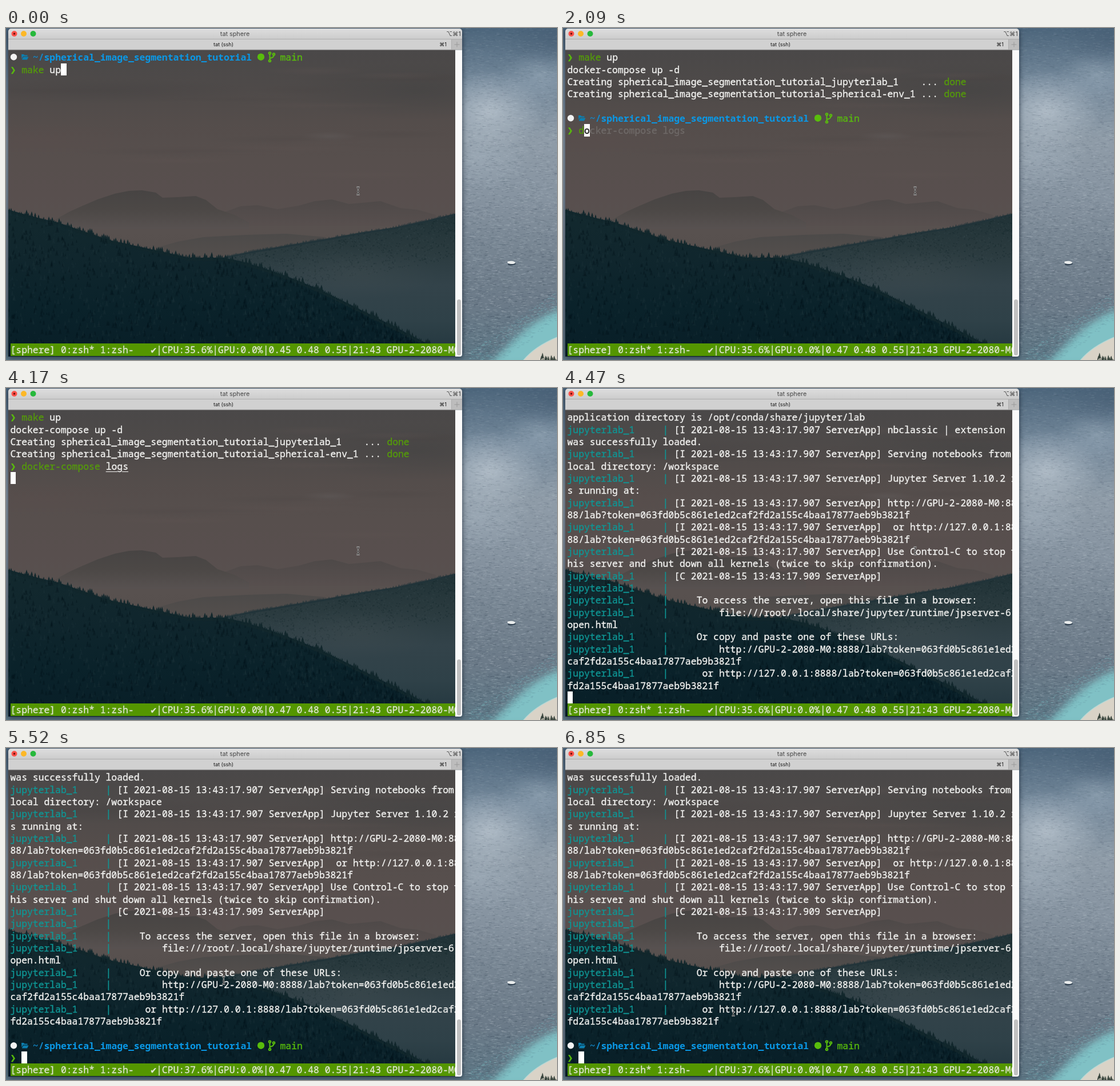
These frames come from a looping animation (964x581 px, 8 s). An HTML page with a canvas:

```html
<!DOCTYPE html>
<html lang="en">
<head>
<meta charset="utf-8">
<title>Terminal session</title>
<style>
  html, body { margin: 0; width: 100%; height: 100%; overflow: hidden; background: #76879a; }
  #stage { position: relative; width: 964px; height: 581px; overflow: hidden; }
  canvas, svg { position: absolute; left: 0; top: 0; }
  #win { position: absolute; left: 4px; top: 1px; width: 794px; height: 574px;
    border-radius: 5px 5px 4px 4px; box-shadow: 0 2px 9px 1px rgba(15, 25, 40, .6); }
  #screen { position: absolute; left: 0; top: 38px; width: 786px; height: 537px; overflow: hidden; }
  #screen span { position: absolute; white-space: pre; color: #f2f2f0; height: 21.33px;
    font: 500 16.39px/21.33px "Noto Sans Mono", "DejaVu Sans Mono", monospace;
    font-variant-ligatures: none; -webkit-text-stroke: .35px currentColor; }
  #screen .cmd { color: #559b0a; }
  #screen .main { color: #59bd0c; }
  #screen .path { color: #0a98e6; font-weight: 700; -webkit-text-stroke: 0; }
  #screen .home { color: #1289cb; font-weight: 700; -webkit-text-stroke: 0; }
  #screen .teal { color: #0f9695; }
  #screen .ghost { color: #6f6a68; }
  #screen .under { text-decoration: underline; text-decoration-thickness: 1px; text-underline-offset: 3px; }
  #screen .cursor { background: #fff; color: #111; min-width: 9.83px; }
  #screen .sel { background: #bb9a00; color: #16140a; }
  #screen .bar { background: #549600; color: #dfe5d3; width: 779px; }
  #screen .check { color: #dfe5d3; }
  #screen svg { overflow: visible; }
  #chrome text { font-family: Inter, "DejaVu Sans", sans-serif; text-anchor: middle; }
</style>
</head>
<body>
<div id="stage">
  <canvas id="sea" width="964" height="581"></canvas>
  <div id="win"></div>
  <canvas id="hills" width="964" height="581"></canvas>
  <div id="screen"></div>
  <svg id="chrome" width="964" height="581">
    <defs>
      <linearGradient id="title" x2="0" y2="1">
        <stop stop-color="#dedede"/><stop offset="1" stop-color="#cbcbcb"/>
      </linearGradient>
    </defs>
    <path d="M4 20V6a5 5 0 0 1 5-5H793a5 5 0 0 1 5 5V20Z" fill="url(#title)"/>
    <path d="M4 20H798V38H4Z" fill="#d1d1d1"/>
    <path d="M780 20H798V38H780Z" fill="#bdbdbd"/>
    <path d="M4 19.5H798M4 38H798M779.5 20V38" stroke="#adadad" fill="none"/>
    <path d="M784.5 29H793.5M789 24.5V33.5" stroke="#999"/>
    <circle cx="14.5" cy="10" r="5" fill="#fb5149"/><circle cx="14.5" cy="10" r="1.7" fill="#6d0b08"/>
    <circle cx="31" cy="10" r="5" fill="#fdb827"/>
    <circle cx="47.5" cy="10" r="5" fill="#27b93c"/>
    <text x="400.5" y="14" font-size="10.8" fill="#454545">tat sphere</text>
    <text x="783" y="14" font-size="10.5" fill="#444">⌥⌘1</text>
    <text x="380.5" y="32.3" font-size="9" fill="#151515">tat (ssh)</text>
    <text x="764.5" y="32.3" font-size="9" fill="#151515">⌘1</text>
    <path d="M786 38.5H798V571a4 4 0 0 1-4 4H786Z" fill="#fafafa"/>
    <rect x="789" y="475" width="7" height="98" rx="3.5" fill="#c1c1c1"/>
    <g id="mouse" fill="none">
      <path id="beam" d="M-2.500-7Q0-6.500 0-4V4Q0 6.500-2.500 7M2.500-7Q0-6.500 0-4M0 4Q0 6.500 2.500 7M-1.500 1H1.500"/>
      <use href="#beam" stroke="#d8d8d8" stroke-width="2.2"/>
      <use href="#beam" stroke="#222"/>
    </g>
  </svg>
</div>
<script>
const $ = id => document.getElementById(id);
let seed = 7;
const rnd = (a = 0, b = 1) => {
  seed = (seed * 16807) % 2147483647;
  return a + (b - a) * seed / 2147483647;
};

// ---------- scenery ----------
const shade = (g, y0, y1, ...colors) => {
  const grad = g.createLinearGradient(0, y0, 0, y1);
  colors.forEach((c, i) => grad.addColorStop(i / (colors.length - 1), c));
  return grad;
};
const land = (g, points, base, fill) => {
  g.beginPath();
  g.moveTo(points[0][0], base);
  points.forEach(p => g.lineTo(...p));
  g.lineTo(points.at(-1)[0], base);
  g.fillStyle = fill;
  g.fill();
};
const heightAt = (points, x) => {
  const i = Math.max(1, points.findIndex(p => p[0] >= x));
  const [[x0, y0], [x1, y1]] = [points[i - 1], points[i]];
  return y0 + (y1 - y0) * (x - x0) / (x1 - x0);
};
const blob = (g, x, y, rx, ry, rgb, alpha) => {
  g.save();
  g.translate(x, y);
  g.scale(rx, ry);
  const grad = g.createRadialGradient(0, 0, 0, 0, 0, 1);
  grad.addColorStop(0, `rgba(${rgb},${alpha})`);
  grad.addColorStop(1, `rgba(${rgb},0)`);
  g.fillStyle = grad;
  g.fillRect(-1, -1, 2, 2);
  g.restore();
};
const tree = (g, x, y, h, fill) => {
  g.fillStyle = fill;
  for (let k = 0; k < 3; k++) {
    const top = y - h + k * h * .28, w = h * (.14 + .1 * k);
    g.beginPath();
    g.moveTo(x, top);
    g.lineTo(x + w, top + h * .45);
    g.lineTo(x - w, top + h * .45);
    g.fill();
  }
};

function drawSea() {
  const g = $('sea').getContext('2d');
  g.fillStyle = shade(g, 0, 581, '#4c657b', '#75899b', '#8f9ca8', '#8794a1', '#778592', '#6b7a88', '#5d7684');
  g.fillRect(0, 0, 964, 581);
  blob(g, 845, 145, 95, 70, '196,206,215', .65);
  blob(g, 830, 225, 90, 60, '172,186,198', .4);
  blob(g, 935, 85, 70, 45, '168,184,198', .4);
  blob(g, 960, 20, 90, 50, '60,82,105', .35);
  // ripples get stronger towards the shore
  for (let i = 0; i < 5000; i++) {
    const y = rnd(0, 575), a = .07 + y / 3600;
    g.fillStyle = rnd() < .5 ? `rgba(38,54,70,${a})` : `rgba(214,224,230,${a})`;
    g.fillRect(rnd(796, 964), y, rnd(2, 7), 1);
  }
  g.save();
  g.filter = 'blur(7px)';
  g.fillStyle = '#80c1c5';
  g.beginPath();
  g.moveTo(838, 592);
  g.bezierCurveTo(880, 566, 900, 512, 985, 488);
  g.lineTo(985, 592);
  g.fill();
  g.restore();
  for (let i = 0; i < 800; i++) {
    const x = rnd(810, 964), y = 596 - (x - 810) * .7 + rnd(-30, 24);
    g.fillStyle = rnd() < .5 ? 'rgba(128,196,200,.4)' : 'rgba(86,128,145,.3)';
    g.fillRect(x, y, rnd(1, 5), 1);
  }
  g.strokeStyle = '#b9d8d5';
  g.lineWidth = 3;
  g.fillStyle = '#d9d3c7';
  g.beginPath();
  g.moveTo(900, 590);
  g.quadraticCurveTo(922, 556, 980, 536);
  g.lineTo(980, 590);
  g.stroke();
  g.fill();
  for (let i = 0; i < 18; i++) tree(g, rnd(935, 964), rnd(577, 586), rnd(4, 10), '#38443c');
  g.fillStyle = '#334353';
  g.beginPath(); g.ellipse(885, 413, 7, 2.5, -.1, 0, 7); g.fill();
  g.fillStyle = '#e9ecec';
  g.beginPath(); g.ellipse(884, 410.3, 7, 2.6, .05, 0, 7); g.fill();
}

function drawHills() {
  const g = $('hills').getContext('2d');
  g.beginPath();
  g.rect(4, 38, 782, 537);
  g.clip();
  g.fillStyle = shade(g, 38, 420, '#4a4848', '#4e4a49', '#544d4b', '#574f4d', '#584f4e', '#58514f', '#554e4c');
  g.fillRect(4, 38, 782, 537);
  blob(g, 720, 110, 240, 50, '66,66,66', .55);
  blob(g, 180, 110, 260, 22, '70,67,67', .5);
  blob(g, 60, 195, 190, 30, '90,77,76', .4);
  blob(g, 565, 190, 48, 9, '96,91,90', .5);
  for (let i = 0; i < 16; i++)
    blob(g, rnd(0, 780), rnd(60, 260), rnd(70, 200), rnd(3, 9), i % 2 ? '72,67,66' : '95,84,82', .24);

  land(g, [[340, 335], [380, 323], [410, 312], [440, 310], [475, 317], [512, 311], [540, 303], [570, 300],
    [600, 308], [655, 303], [690, 315], [720, 318], [752, 327]], 346, shade(g, 300, 344, '#4e4948', '#574f4e'));
  land(g, [[85, 336], [110, 322], [132, 312], [160, 300], [190, 290], [215, 285], [238, 284], [262, 288],
    [274, 297], [300, 296], [332, 294], [350, 301], [370, 317], [400, 327], [425, 340]], 352,
    shade(g, 285, 350, '#474443', '#4c4846', '#575150'));
  land(g, [[265, 384], [300, 374], [345, 366], [420, 362], [490, 360], [560, 366]], 400,
    shade(g, 360, 396, '#4c4a49', '#534e4c'));

  const right = [[380, 401], [430, 391], [500, 379], [560, 369], [620, 358], [680, 349], [740, 336], [790, 324]];
  land(g, right, 576, shade(g, 325, 575, '#203236', '#2a3a3e', '#33434a', '#2f4148', '#22363e'));
  for (let x = 385; x < 788; x += 2.5) tree(g, x, heightAt(right, x) + 3, rnd(4, 7), '#22343a');
  for (let i = 0; i < 1300; i++) {
    const x = rnd(390, 786), y = heightAt(right, x) + rnd(2, 75);
    g.fillStyle = rnd() < .5 ? 'rgba(14,32,38,.25)' : 'rgba(70,86,88,.18)';
    g.fillRect(x, y, 2, 2);
  }
  blob(g, 610, 430, 150, 45, '66,77,80', .4);

  const left = [[0, 317], [50, 331], [90, 340], [130, 354], [180, 371], [230, 382], [280, 393], [320, 402],
    [380, 402], [410, 408], [450, 420], [500, 438], [545, 456], [590, 478], [630, 498], [680, 523],
    [720, 544], [760, 564]];
  land(g, left, 576, shade(g, 315, 575, '#13292e', '#10262d', '#0a222a', '#081e27'));
  for (let x = 3; x < 755; x += 3) tree(g, x, heightAt(left, x) + 5, 6 + 10 * rnd() ** 2, '#12272c');
  for (let i = 0; i < 2000; i++) {
    const x = rnd(4, 750), top = heightAt(left, x) + 8;
    const y = rnd(top, 582);
    if (y > top) tree(g, x, y, rnd(4, 11), rnd() < .55 ? 'rgba(4,18,24,.28)' : 'rgba(39,62,66,.18)');
  }
}

// ---------- terminal ----------
const X = 7.5, Y = 2.3, CW = 9.834, CH = 21.33;
const at = (col, row) => `left:${X + col * CW}px;top:${Y + row * CH}px`;
const put = (col, row, text, cls = '') => `<span class="${cls}" style="${at(col, row)}">${text}</span>`;
const cursor = (col, row, ch = ' ') => put(col, row, ch, 'cursor');
const arrow = row => put(0, row, '❯', 'main');

const icons = row => `<svg width="1" height="1" style="${at(0, row)}">
  <circle cx="5.5" cy="10.7" r="5.7" fill="#f3f3f3"/>
  <path d="M19 6h4l1.5 1.5h5V9.5H22L19.5 14ZM22.5 10.5H31.5L29 15.5H19.7Z" fill="#0c7fb0"/>
  <circle cx="438" cy="10.7" r="6.2" fill="#59bd0c"/>
  <g fill="none" stroke="#59bd0c" stroke-width="2">
    <path d="M453.5 6V16M460.5 8Q460.5 11.5 454 13"/>
    <circle cx="453.5" cy="4" r="1.8"/><circle cx="460.5" cy="6" r="1.8"/><circle cx="453.5" cy="17.5" r="1.8"/>
  </g></svg>`;
const prompt = row => icons(row) + put(4, row, '~/', 'home') +
  put(6, row, 'spherical_image_segmentation_tutorial', 'path') + put(48, row, 'main', 'main') + arrow(row + 1);

const status = (load = '0.47', cpu = '35.6', windows = '0:zsh* 1:zsh-   ') =>
  put(0, 24, `[sphere] ${windows} |CPU:${cpu}%|GPU:0.0%|${load} 0.48 0.55|21:43 GPU-2-2080-M0`, 'bar') +
  put(25, 24, '✔', 'check');

const make = row => put(2, row, 'make', 'cmd') + put(7, row, 'up');
const started = arrow(0) + make(0) + put(0, 1, 'docker-compose up -d');
const project = 'Creating spherical_image_segmentation_tutorial_';
const creating = started + put(0, 2, project + 'jupyterlab_1 ...') + put(0, 3, project + 'spherical-env_1 ...');
const done = started + ['jupyterlab_1   ', 'spherical-env_1'].map((name, i) =>
  put(0, i + 2, `${project}${name} ...`) + put(67, i + 2, 'done', 'cmd')).join('');

const command = 'docker-compose logs';
const typed = n => done + prompt(5) + put(2, 6, command.slice(0, n), 'cmd') +
  put(3 + n, 6, command.slice(n + 1), 'ghost') + cursor(2 + n, 6, command[n]);
const logs = row => put(2, row, 'docker-compose', 'cmd') + put(17, row, 'logs', 'under');

const info = '| [I 2021-08-15 13:43:17.907 ServerApp] ';
const token = '063fd0b5c861e1ed2caf2fd2a155c4baa17877aeb9b3821f';
const url = '88/lab?token=' + token;
const service = 'jupyterlab_1     ';
const log = [
  'application directory is /opt/conda/share/jupyter/lab',
  info + 'nbclassic | extension ',
  'was successfully loaded.',
  info + 'Serving notebooks from ',
  'local directory: /workspace',
  info + 'Jupyter Server 1.10.2 i',
  's running at:',
  info + 'http://GPU-2-2080-M0:88',
  url,
  info + ' or http://127.0.0.1:88',
  url,
  info + 'Use Control-C to stop t',
  'his server and shut down all kernels (twice to skip confirmation).',
  '| [C 2021-08-15 13:43:17.909 ServerApp]',
  '|',
  '|     To access the server, open this file in a browser:',
  '|         file:///root/.local/share/jupyter/runtime/jpserver-6-',
  'open.html',
  '|     Or copy and paste one of these URLs:',
  '|         http://GPU-2-2080-M0:8888/lab?token=' + token.slice(0, 17),
  token.slice(17),
  '|      or http://127.0.0.1:8888/lab?token=' + token.slice(0, 21),
  token.slice(21)
];
const show = lines => lines.map((s, row) => s[0] === '|'
  ? put(0, row, service + '|', 'teal') + put(18, row, s.slice(1))
  : put(0, row, s)).join('');
const output = show(log.slice(2)) + prompt(22);
const ready = output + cursor(2, 23);

const copyMode = marks => output + put(72, 0, '[0/1956]', 'sel') + marks +
  status('0.47', '37.6', '0:[tmux]* 1:zsh-');
const [linkHead, linkTail] = [(service + log[21]).slice(26), log[22]];
const dragTo = col => copyMode(put(26, 19, linkHead, 'sel') +
  put(0, 20, linkTail.slice(0, col), 'sel') + cursor(col, 20, linkTail[col] || ' '));

// ---------- timeline: start, screen, pointer ----------
const rest = [616, 285];
const STEP = 148.6;
const scenes = [
  [0, prompt(0) + make(1) + cursor(9, 1) + status('0.45')],
  [300, started + cursor(0, 2) + status('0.45')],
  [600, creating + cursor(0, 4) + status('0.45')],
  [1050, done + prompt(5) + cursor(2, 6) + status()],
  ...[1, 2, 4, 6].map((n, i) => [2090 + i * 147, typed(n) + status()]),
  [3130, done + prompt(5) + logs(6) + cursor(21, 6) + status()],
  [4170, done + arrow(4) + logs(4) + cursor(0, 5) + status()],
  [4470, show(log) + cursor(0, 23) + status()],
  [4620, ready + status()]
];
// the pointer glides to the link in even time steps
for (let k = 1; k < 8; k++) {
  const p = k / 8, e = p * p * (3 - 2 * p);
  scenes.push([4920 + (k - 1) * STEP, ready + status('0.47', k > 1 ? '37.6' : '35.6'),
    [616 - 344 * e, 285 + 178 * e]]);
}
const after = ready + status('0.47', '37.6');
scenes.push(
  [5960, copyMode(cursor(26, 19)), [272, 463]],
  [6110, copyMode(put(26, 19, ' ', 'sel') + cursor(27, 19, 'h')), [280, 464]],
  [6258, dragTo(27), [280, 474]],
  [6406, dragTo(27), [276, 479]],
  [6554, dragTo(26), [270, 479]],
  [6702, after, [284, 470]],
  [6850, after, [298, 462]]
);

drawSea();
drawHills();

let current = -1;
const start = performance.now();
function play() {
  const t = (performance.now() - start) % 8000;
  const i = scenes.findLastIndex(s => s[0] <= t);
  if (i !== current) {
    current = i;
    const [, html, pointer = rest] = scenes[i];
    $('screen').innerHTML = html;
    $('mouse').setAttribute('transform', `translate(${pointer})`);
  }
  requestAnimationFrame(play);
}
play();
</script>
</body>
</html>
```
